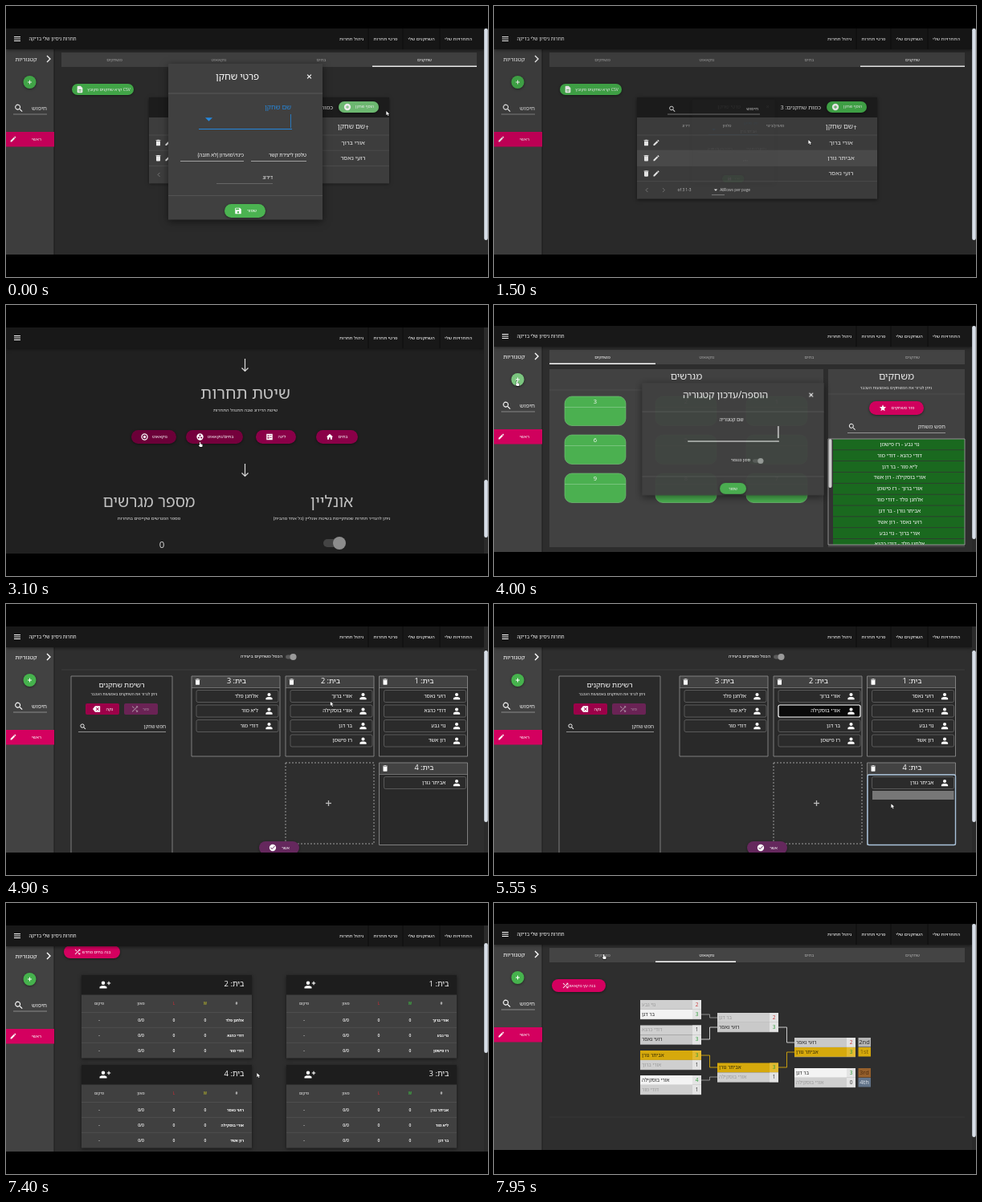
An HTML page with a canvas for the animation above (8000 ms loop, 600 px wide and 338 px high).

```html
<!DOCTYPE html>
<html lang="he">
<head>
<meta charset="utf-8">
<title>ניהול תחרות</title>
<style>
html,body{margin:0;width:100%;height:100%;overflow:hidden;background:#000}
canvas{display:block;width:600px;height:338px}
</style>
</head>
<body>
<canvas id="stage"></canvas>
<script>
const W = 600, H = 338, LOOP = 8000;
const LIFT = 2; // some clips sit slightly higher on the stage
const FONT = '"Open Sans","Noto Sans Hebrew","Noto Sans","Liberation Sans",sans-serif';
const PINK = '#d4005f', GREEN = '#46b24d', CARD = '#424242', PAGE = '#2e2e2e', DARK = '#1d1d1d';
const P = ['אורי ברוך', 'רועי נאסר', 'אביתר גורן', 'נוי גבע', 'רז פישמן', 'דודי כהנא',
  'בר דגן', 'ליא מור', 'אורי בוסקילה', 'רון אשד', 'אלחנן פלד', 'דודי מור'];

const DISC = 'M12 2a10 10 0 1 0 0 20 10 10 0 0 0 0-20z';
const ICONS = {
  trash: 'M6 19a2 2 0 0 0 2 2h8a2 2 0 0 0 2-2V7H6zM19 4h-3.5l-1-1h-5l-1 1H5v2h14z',
  pencil: 'M3 17.2V21h3.8L17.8 9.9l-3.7-3.7zM20.7 7a1 1 0 0 0 0-1.4l-2.3-2.3a1 1 0 0 0-1.4 0l-1.9 1.8 3.8 3.8z',
  person: 'M12 3a4.5 4.5 0 1 0 0 9 4.5 4.5 0 0 0 0-9zM3 21v-3c0-5 18-5 18 0v3z',
  search: 'M15.5 14h-.8l-.3-.3a6.5 6.5 0 1 0-.7.7l.3.3v.8l5 5 1.5-1.5zM9.5 14a4.5 4.5 0 1 1 0-9 4.5 4.5 0 0 1 0 9z',
  save: 'M17 3H5a2 2 0 0 0-2 2v14a2 2 0 0 0 2 2h14a2 2 0 0 0 2-2V7zM12 19a3 3 0 1 1 0-6 3 3 0 0 1 0 6zM15 9H5V5h10z',
  file: 'M14 2H6a2 2 0 0 0-2 2v16a2 2 0 0 0 2 2h12a2 2 0 0 0 2-2V8zM8 12h8v2H8zM8 16h8v2H8z',
  star: 'M12 17.3 18.2 21l-1.6-7L22 9.2l-7.2-.6L12 2 9.2 8.6 2 9.2 7.5 14l-1.7 7z',
  home: 'M10 20v-6h4v6h5v-8h3L12 3 2 12h3v8z',
  shuffle: 'M10.6 9.2 5.4 4 4 5.4l5.2 5.2zM14.5 4l2 2L4 18.6 5.4 20 18 7.5l2 2V4zM14.8 13.4l-1.4 1.4 3.1 3.1-2 2.1H20v-5.5l-2 2z',
  add: DISC + 'M17 13h-4v4h-2v-4H7v-2h4V7h2v4h4z',
  check: DISC + 'M10 17l-5-5 1.4-1.4 3.6 3.6 7.6-7.6L19 8z',
  table: 'M3 3h18v18H3zM6 7h5v3H6zM6 13h5v4H6zM13 7h5v2h-5zM13 13h5v2h-5z',
  aim: DISC + 'M12 5a7 7 0 1 1 0 14 7 7 0 0 1 0-14zM12 8a4 4 0 1 0 0 8 4 4 0 0 0 0-8z',
  group: DISC + 'M12 5a2.5 2.5 0 1 0 0 5 2.5 2.5 0 0 0 0-5zM8 12a2.5 2.5 0 1 0 0 5 2.5 2.5 0 0 0 0-5zM16 12a2.5 2.5 0 1 0 0 5 2.5 2.5 0 0 0 0-5z',
  erase: 'M22 3H7L0 12l7 9h15zM19 15.6 17.6 17 14 13.4 10.4 17 9 15.6 12.6 12 9 8.4 10.4 7 14 10.6 17.6 7 19 8.4 15.4 12z',
  hand: 'M9 11V4a1.5 1.5 0 0 1 3 0v6l6 1.5c1.5.4 2 1.2 1.8 2.5L19 21H10l-5-6 1.3-1.2L9 15z',
  arrow: 'M7 3v16l4-4 3 7 2.5-1-3-7H19z'
};
const paths = {};
for (const k in ICONS) paths[k] = new Path2D(ICONS[k]);

const stage = document.getElementById('stage');
const dpr = window.devicePixelRatio || 1;
const layers = [];
let c, depth = 0;

function setup(cv) {
  cv.width = W * dpr;
  cv.height = H * dpr;
  return cv.getContext('2d');
}
const main = setup(stage);

// Paints fn on its own layer, then blends the layer in, scaled about (cx, cy).
function group(alpha, scale, cx, cy, fn) {
  if (alpha <= 0) return;
  const outer = c;
  const g = layers[depth] || (layers[depth] = setup(document.createElement('canvas')));
  depth++;
  g.setTransform(dpr, 0, 0, dpr, 0, 0);
  g.clearRect(0, 0, W, H);
  c = g;
  fn();
  c = outer;
  depth--;
  c.save();
  c.globalAlpha = alpha;
  c.translate(cx, cy);
  c.scale(scale, scale);
  c.drawImage(g.canvas, -cx, -cy, W, H);
  c.restore();
}

const clamp = v => Math.max(0, Math.min(1, v));
const prog = (t, a, b) => clamp((t - a) / (b - a));
const ease = p => p * p * (3 - 2 * p);
const mix = (a, b, p) => a + (b - a) * p;

function text(s, x, y, size, color = '#fff', align = 'center', weight = 400) {
  c.font = `${weight} ${size}px ${FONT}`;
  c.direction = 'rtl';
  c.textAlign = align;
  c.fillStyle = color;
  c.fillText(s, x, y + size * 0.3);
}
function rect(x0, y0, x1, y1, color) {
  c.fillStyle = color;
  c.fillRect(x0, y0, x1 - x0, y1 - y0);
}
function round(x0, y0, x1, y1, r, fill, stroke, lw = 1) {
  c.beginPath();
  c.roundRect(x0, y0, x1 - x0, y1 - y0, r);
  if (fill) { c.fillStyle = fill; c.fill(); }
  if (stroke) { c.strokeStyle = stroke; c.lineWidth = lw; c.stroke(); }
}
function disc(x, y, r, color) {
  c.fillStyle = color;
  c.beginPath();
  c.arc(x, y, r, 0, 7);
  c.fill();
}
function line(pts, color = '#777', lw = 0.7) {
  c.strokeStyle = color;
  c.lineWidth = lw;
  c.beginPath();
  for (let i = 0; i < pts.length; i += 2) c.lineTo(pts[i], pts[i + 1]);
  c.stroke();
}
function icon(name, x, y, size, color = '#fff') {
  c.save();
  c.translate(x - size / 2, y - size / 2);
  c.scale(size / 24, size / 24);
  c.fillStyle = color;
  c.fill(paths[name], 'evenodd');
  c.restore();
}
function shadowed(blur, fn) {
  c.save();
  c.shadowColor = 'rgba(0,0,0,.5)';
  c.shadowBlur = blur * dpr;
  c.shadowOffsetY = blur / 4 * dpr;
  fn();
  c.restore();
}
function pill(x0, y0, x1, y1, color, label, tx, size, ic, ix, fg = '#fff') {
  shadowed(3, () => round(x0, y0, x1, y1, (y1 - y0) / 2, color));
  const y = (y0 + y1) / 2;
  text(label, tx, y, size, fg, 'center', 500);
  if (ic) icon(ic, ix, y, 10, fg);
}
function cross(x, y, r, color = '#fff') {
  line([x - r, y - r, x + r, y + r], color, 1.1);
  line([x - r, y + r, x + r, y - r], color, 1.1);
}
function plus(x, y, r, color, lw) {
  line([x - r, y, x + r, y], color, lw);
  line([x, y - r, x, y + r], color, lw);
}
function toggle(x0, x1, y, r) {
  round(x0, y - r * 0.6, x1, y + r * 0.6, r * 0.6, '#5a5a5a');
  disc(x1 - r, y, r, '#9a9a9a');
}
function triangle(x, y, r, color) {
  c.fillStyle = color;
  c.beginPath();
  c.moveTo(x - r, y - r / 2);
  c.lineTo(x + r, y - r / 2);
  c.lineTo(x, y + r / 2);
  c.fill();
}
const glow = a => `rgba(255,255,255,${a})`;

// Track points: [time, x, y]
function cursor(t, track, hand) {
  let i = 0;
  while (i < track.length - 2 && t > track[i + 1][0]) i++;
  const a = track[i], b = track[i + 1], p = ease(prog(t, a[0], b[0]));
  const x = mix(a[1], b[1], p), y = mix(a[2], b[2], p);
  const name = hand ? 'hand' : 'arrow';
  icon(name, x, y, 9.5, '#000');
  icon(name, x, y, 8, '#fff');
}

function topbar(title) {
  shadowed(4, () => rect(0, 28, 595, 54, '#181818'));
  for (const d of [-2.5, 0, 2.5]) line([10, 41 + d, 18, 41 + d], '#fff', 1);
  if (title) text('תחרות ניסיון שלי בדיקה', 58, 41, 5.9, '#fff', 'center', 500);
  const nav = [['ניהול תחרות', 430], ['פרטי תחרות', 472.5], ['השחקנים שלי', 517], ['התחרויות שלי', 563]];
  for (const [s, x] of nav) text(s, x, 41, 5.8, '#fff', 'center', 500);
  for (const x of [451, 494, 540]) line([x, 28, x, 54], '#080808', 0.6);
}
function scrollbar(y0, y1) {
  rect(595, 28, 600, 310, '#2a2a2a');
  round(595.2, y0, 599.8, y1, 2.3, '#d8dfe8');
}
function sidebar(press = 0) {
  rect(0, 54, 60, 310, CARD);
  line([60, 54, 60, 310], '#1c1c1c', 1);
  text('קטגוריות', 25, 66.5, 7.3);
  line([51, 62, 55, 66, 51, 70], '#fff', 1.4);
  shadowed(3, () => disc(29.5, 95, 8, GREEN));
  if (press) disc(29.5, 95, 8, glow(0.3 * press));
  plus(29.5, 95, 2.5, '#fff', 1);
  icon('search', 16, 127.5, 13);
  text('חיפוש', 51, 127.5, 7.4, '#eee', 'right');
  line([9, 135, 51, 135], '#aaa');
  rect(0, 157, 60, 175.5, PINK);
  icon('pencil', 9, 166, 9);
  text('ראשי', 38, 166, 5.6, '#fff', 'center', 500);
}
function tabs(active, x0, x1, dy = 0) {
  rect(69, 58 + dy, 586, 76 + dy, '#444');
  [['משחקים', 135], ['נוקאאוט', 265], ['בתים', 392.5], ['שחקנים', 521]].forEach(([s, x], i) =>
    text(s, x, 67 + dy, 5.4, i === active ? '#fff' : '#aaa', 'center', 500));
  rect(x0, 74.5 + dy, x1, 76 + dy, '#fff');
}
function frame(oy, bg, body) {
  rect(0, 0, W, H, '#000');
  c.save();
  c.translate(0, oy);
  c.beginPath();
  c.rect(0, 28, W, 282);
  c.clip();
  rect(0, 28, W, 310, bg);
  body();
  c.restore();
}
function dim(a) { if (a > 0) rect(0, 28, W, 310, `rgba(0,0,0,${a})`); }

function playerDialog(t) {
  const blue = '#2587dc';
  shadowed(9, () => rect(202, 72, 394, 266.5, '#404040'));
  text('פרטי שחקן', 288, 88, 11.7);
  cross(377.5, 88, 2.4);
  line([202, 109, 394, 109], '#636363');
  text('שם שחקן', 355, 126.5, 8.2, blue, 'right');
  triangle(252.5, 141.5, 4.5, blue);
  const name = P[2].slice(0, Math.floor(prog(t, 300, 850) * P[2].length));
  text(name, 352, 145, 8.5, '#fff', 'right');
  if (t % 1000 < 500 && !name) line([354.5, 135, 354.5, 152], blue, 0.8);
  line([240, 153.5, 356, 153.5], blue, 1.1);
  text('טלפון ליצירת קשר', 374, 186, 6.2, '#fff', 'right');
  text('כינוי\\מועדון (לא חובה)', 296, 186, 6.2, '#fff', 'right');
  text('דירוג', 332, 214, 6.2, '#fff', 'right');
  line([305, 193.5, 374, 193.5], '#ccc');
  line([217, 193.5, 296, 193.5], '#ccc');
  line([262, 221.5, 332, 221.5], '#777');
  line([202, 236.5, 394, 236.5], '#5c5c5c');
  pill(272, 247, 323, 264, '#4bb351', 'שמור', 306, 5.4, 'save', 289);
}

function players(t) {
  const three = t >= 1250;
  const rows = three ? [P[0], P[2], P[1]] : [P[0], P[1]];
  frame(0, PAGE, () => {
    sidebar();
    tabs(3, 456, 586);
    pill(82, 97, 159, 111, GREEN, 'CSV קרא שחקנים מקובץ', 128, 5.2, 'file', 92);
    const end = 161 + rows.length * 19.2;
    shadowed(4, () => rect(178, 114, 477, end + 22, CARD));
    rect(178, 114, 477, 139, '#1e1e1e');
    pill(414, 119, 464, 133, GREEN, 'הוסף שחקן', 446.5, 4.9, 'add', 425);
    const ripple = 1 - prog(t, 0, 350);
    if (ripple) round(414, 119, 464, 133, 7, glow(0.25 * ripple));
    text('כמות שחקנים: ' + rows.length, 407, 127, 7.4, '#e5e5e5', 'right');
    icon('search', 222, 128.5, 10);
    text('חיפוש', 329, 128.5, 5.8, '#ddd', 'right');
    line([216, 135, 331, 135], '#aaa');
    text('שם שחקן', 447, 150, 8.5, '#fff', 'right');
    line([449.5, 154, 449.5, 149.5], '#eee');
    line([447.8, 151, 449.5, 149.3, 451.2, 151], '#eee');
    text('מועדון/כינוי', 350, 150, 4.6, '#bbb', 'center', 500);
    text('טלפון', 290, 150, 4.6, '#bbb', 'center', 500);
    text('דירוג', 239, 150, 4.6, '#bbb', 'center', 500);
    rows.forEach((name, i) => {
      const y = 161 + i * 19.2;
      if (three && i === 1) rect(178, y, 477, y + 19, '#525252');
      line([178, y, 477, y], '#5a5a5a');
      text(name, 432, y + 9.5, 7.5);
      icon('trash', 189.5, y + 9.5, 10);
      icon('pencil', 202, y + 9.5, 9.5);
    });
    const fy = end + 11;
    line([178, end, 477, end], '#5a5a5a');
    line([191.5, fy - 2.5, 189, fy, 191.5, fy + 2.5], '#888', 0.9);
    line([210, fy - 2.5, 212.5, fy, 210, fy + 2.5], '#888', 0.9);
    text(`1-${rows.length} of ${rows.length}`, 237, fy, 4.8, '#ddd');
    text('All', 284, fy, 4.8, '#fff');
    triangle(276, fy, 2.2, '#fff');
    line([271, fy + 6, 287, fy + 6], '#aaa');
    text('Rows per page:', 302, fy, 4.8, '#ddd');
    topbar(true);
    dim(mix(0.08, 0.3, prog(t, 0, 300)) * (1 - prog(t, 1250, 1650)));
    scrollbar(28, 292);
    const p = prog(t, 1250, 1520);
    group(1 - p, 1 - p / 2, 298, 169, () => playerDialog(t));
    cursor(t, [[0, 475, 134], [250, 475, 134], [600, 345, 150], [900, 340, 160], [1200, 300, 256],
      [1280, 300, 256], [1500, 393, 170], [1650, 470, 46]]);
  });
}

function downArrow(y) {
  line([297.5, y - 8, 297.5, y + 7], '#ddd', 1.2);
  line([293.5, y + 3.5, 297.5, y + 7.5, 301.5, y + 3.5], '#ddd', 1.2);
}
function details(t) {
  const scroll = mix(-655, -270, ease(prog(t, 1750, 2500))) + 270 * ease(prog(t, 2550, 2950));
  const grey = '#c2c2c2';
  frame(0, '#202020', () => {
    c.save();
    c.translate(0, -scroll);
    ['שם תחרות', 'תיאור', 'מיקום', 'תאריך', 'שעה'].forEach((s, i) => {
      const y = 111 - 131 * (5 - i);
      if (i) downArrow(y - 36);
      text(s, 298, y, 20.5, grey);
      line([240, y + 46, 356, y + 46], '#888');
    });
    downArrow(75);
    text('שיטת תחרות', 298, 111, 20.5, grey);
    text('שיטת הדירוג שבה תתנהל התחרות', 298, 131, 5.6, '#ddd');
    const hover = t > 3000 ? '#75003c' : '#8a0048';
    pill(386, 156, 438, 173, '#8a0048', 'בתים', 419.5, 5.4, 'home', 403);
    pill(311, 156, 361, 173, '#8a0048', 'ליגה', 343.5, 5.4, 'table', 328);
    pill(224, 156, 295, 173, hover, 'בתים/נוקאאוט', 267, 5.4, 'group', 241.5);
    pill(156, 156, 212, 173, '#6b0038', 'נוקאאוט', 191.5, 5.4, 'aim', 172.5);
    downArrow(206);
    text('אונליין', 405.5, 246, 19.5, grey);
    text('מספר מגרשים', 178, 246, 19.5, grey);
    text('ניתן להגדיר תחרות שמתקיימת בשיטת אונליין (כל אחד מהבית)', 405.5, 266, 5.6, '#ddd');
    text('מספר המגרשים שקיימים בתחרות', 178, 266, 5.6, '#ddd');
    text('0', 194, 300, 11.5, '#ddd');
    round(395, 292, 420, 302, 5, '#444');
    disc(415, 297, 8, '#8c8c8c');
    c.restore();
    topbar(false);
    const y = 218 + scroll / 655 * 163;
    scrollbar(y, y + 72);
    cursor(t, [[1650, 470, 46], [2100, 400, 180], [2600, 330, 200], [3050, 242, 174], [3400, 242, 174]], t > 2950);
  });
}

function categoryDialog(t) {
  shadowed(9, () => rect(184, 97, 411, 237.5, '#404040'));
  text('הוספה/עדכון קטגוריה', 288, 112, 11.8);
  cross(395, 112, 2.3);
  line([184, 133, 411, 133], '#636363');
  text('שם קטגוריה', 295.5, 143, 6);
  if (t % 1000 < 500) line([354, 151, 354, 166], '#fff', 1.2);
  line([241, 170, 355, 170], '#fff', 1.2);
  text('סמן כנגמר', 319, 193.5, 5.6, '#fff', 'right');
  toggle(322, 335.5, 194.5, 3.6);
  line([184, 214, 411, 214], '#5c5c5c');
  pill(281, 222, 314, 236, '#4bb351', 'שמור', 297.5, 5);
}

function games(t) {
  const pairs = [[3, 4], [5, 11], [7, 6], [8, 9], [0, 4], [10, 11], [2, 6], [1, 9], [0, 3], [10, 5]];
  const press = prog(t, 3700, 3750) * (1 - prog(t, 4150, 4300));
  frame(-LIFT, PAGE, () => {
    sidebar(press);
    tabs(0, 69, 201);
    topbar(true);
    c.save();
    c.translate(0, LIFT);
    rect(69, 80, 410, 302, CARD);
    text('מגרשים', 239.5, 89.5, 12.2, '#eee');
    line([69, 106, 410, 106], '#555');
    for (let i = 0; i < 9; i++) {
      const x = 314 - i % 3 * 113, y = 114 + Math.floor(i / 3) * 48;
      round(x, y, x + 76, y + 36.5, 9, '#4db352', '#7ecb82', 0.6);
      text(i + 1, x + 38, y + 7, 7.5);
      line([x, y + 13.5, x + 76, y + 13.5], '#8fd093');
    }
    rect(416, 80, 586, 302, CARD);
    text('משחקים', 501, 89.5, 12.2, '#eee');
    text('ניתן לגרור את המשחקים באמצעות העכבר', 500.5, 103, 5.1, '#eee');
    line([416, 111, 586, 111], '#555');
    pill(467, 120, 535, 137, PINK, 'פזר משחקים', 509, 5.4, 'star', 484);
    icon('search', 446, 152, 11);
    text('חפש משחק', 562, 152, 7, '#eee', 'right');
    line([440, 159.5, 562, 159.5], '#bbb');
    c.save();
    c.beginPath();
    c.rect(416, 167, 170, 132);
    c.clip();
    rect(416, 167, 586, 299, '#333');
    pairs.forEach(([a, b], i) => {
      const y = 167 + i * 13.85;
      rect(422, y + 0.3, 586, y + 13.4, '#1b6b20');
      text(`${P[a]} - ${P[b]}`, 505, y + 6.8, 6.7);
    });
    c.restore();
    round(416.5, 167, 420.5, 228, 2, '#d5d5d5');
    round(416, 167, 586, 299, 0, null, '#aaa', 0.8);
    c.restore();
    const close = 1 - prog(t, 4420, 4620);
    const p = ease(prog(t, 3780, 4010)) * close;
    dim(0.3 * prog(t, 3980, 4300) * close);
    scrollbar(28, 294);
    c.translate(0, LIFT);
    group(p * 0.96, 0.5 + p / 2, 298, 167, () => categoryDialog(t));
    cursor(t, [[3450, 150, 140], [3750, 29, 98], [4080, 29, 98], [4350, 395, 115], [4700, 395, 115]],
      t > 3650 && t < 4150);
  });
}

function playerCard(x, y, name, lit) {
  round(x, y, x + 102, y + 15, 2, lit ? '#0a0a0a' : '#2b2b2b', lit ? '#fff' : '#666', lit ? 1.2 : 0.8);
  text(name, x + 77, y + 7.3, 6.6, '#fff', 'right');
  icon('person', x + 90.5, y + 7.5, 11);
}
function house(n, x, y, h, list, opt = {}) {
  rect(x, y, x + 110, y + h, '#292929');
  rect(x, y, x + 110, y + 14.5, CARD);
  round(x, y, x + 110, y + h, 0, null, '#8a8a8a', 0.9);
  line([x, y + 14.5, x + 110, y + 14.5], '#8a8a8a');
  if (opt.drop) round(x + 0.5, y + 15, x + 110, y + h, 2, null, '#a9c2da', 1.4);
  text('בית: ' + n, x + 56, y + 6.5, 9.2);
  icon('trash', x + 7.5, y + 7, 10);
  list.forEach((id, i) => playerCard(x + 6, y + 17.5 + i * 18.5, P[id], id === opt.lit));
}
function houses(t) {
  const moved = t >= 5720, drag = t >= 5200 && !moved;
  const track = [[4700, 395, 118], [5150, 420, 134], [5200, 420, 134], [5500, 496, 254], [5700, 496, 242],
    [5800, 496, 242], [6150, 345, 304], [6400, 345, 304]];
  const over = t >= 5400 && !moved;
  frame(0, PAGE, () => {
    sidebar();
    text('הכפל משחקים ביצירה', 344, 65, 5.7, '#fff', 'right');
    toggle(348, 361.5, 66, 4);
    line([69, 82, 586, 82], '#444');
    round(81, 90, 207, 320, 0, '#2a2a2a', '#8a8a8a', 0.9);
    text('רשימת שחקנים', 144, 101, 8.8);
    text('ניתן לגרור את השחקנים באמצעות העכבר', 147, 112.5, 4.8, '#eee', 'center', 500);
    round(99, 124, 141, 138, 2, '#9c0049');
    text('נקה', 129, 131, 5.4);
    icon('erase', 113, 131, 10);
    round(147, 124, 189, 138, 2, '#6a2355');
    text('פזר', 174, 131, 5.4, '#a98aa0');
    icon('shuffle', 160.5, 131, 11, '#a98aa0');
    icon('search', 96, 153, 9.5);
    text('חפש שחקן', 199, 153, 6, '#eee', 'right');
    line([90, 159.5, 199, 159.5], '#bbb');
    house(3, 231, 90, 100, [10, 7, 11]);
    house(2, 348, 90, 100, moved ? [0, 6, 4] : [0, 8, 6, 4], { lit: drag ? 8 : -1 });
    house(1, 464.5, 90, 100, [1, 5, 3, 9]);
    house(4, 464.5, 198, 102.5, moved ? [2, 8] : [2], { drop: over });
    if (over) rect(471, 233, 572.5, 244, '#777');
    c.setLineDash([2, 2]);
    round(348, 198, 458, 299, 0, null, '#aaa', 0.9);
    c.setLineDash([]);
    plus(401.5, 248.5, 3.5, '#bbb', 1.3);
    pill(315, 296, 365, 312, '#65285d', 'אשר', 348, 5.4, 'check', 332);
    topbar(true);
    scrollbar(58, 272);
    cursor(t, track, t > 6100);
  });
}

function groupTable(n, x, y, ids, wColor) {
  shadowed(4, () => rect(x, y, x + 212, y + 104, '#404040'));
  rect(x, y, x + 212, y + 25, DARK);
  text('בית: ' + n, x + 202.5, y + 11.5, 9.5, '#fff', 'right');
  icon('person', x + 27, y + 12.5, 12);
  plus(x + 34, y + 10.5, 2.2, '#fff', 1.1);
  const cols = [193, 154, 115, 74, 22];
  const heads = [['#', '#ddd'], ['W', wColor], ['L', '#c22b35'], ['מאזן', '#bbb'], ['מיקום', '#bbb']];
  heads.forEach(([s, col], i) => text(s, x + cols[i], y + 36, 4.5, col, 'center', 600));
  ids.forEach((id, i) => {
    const ry = y + 57 + i * 18.9;
    line([x, ry - 10, x + 212, ry - 10], '#555');
    text(P[id], x + 202, ry, 4.8, '#fff', 'right', 600);
    ['0', '0', '0/0', '-'].forEach((s, k) => text(s, x + cols[k + 1], ry, 5, '#fff', 'center', 600));
  });
}
function tables(t) {
  const s = 45 * ease(prog(t, 6900, 7250));
  frame(0, PAGE, () => {
    c.save();
    c.translate(0, 45 - s);
    tabs(2, 327, 456, -45);
    pill(72, 53, 142, 69, PINK, 'בנה בתים מחדש', 112.5, 5.2, 'shuffle', 89);
    groupTable(1, 349, 89.5, [0, 3, 4], '#3fc443');
    groupTable(2, 94, 89.5, [10, 5, 11], '#b5b42c');
    groupTable(3, 349, 201.5, [2, 7, 6], '#3fc443');
    groupTable(4, 94, 201.5, [1, 8, 9], '#b5b42c');
    c.restore();
    sidebar();
    topbar(true);
    const y = 28 + s * 0.49;
    scrollbar(y, y + 137);
    cursor(t, [[6350, 345, 304], [6850, 314, 215], [7400, 314, 215], [7650, 265, 75]]);
  });
}

// Entry: [player, score, style], style 0 lost, 1 won, 2 path, 3 champion
function match(x, y, entries) {
  const look = [['#cfcfcf', '#999'], ['#f3f3f3', '#222'], ['#c9c9c9', '#222'], ['#d6a90c', '#2d2405']];
  entries.forEach(([id, score, k], i) => {
    const ry = y + i * 12;
    rect(x, ry, x + 76, ry + 12, look[k][0]);
    rect(x + 65, ry, x + 76, ry + 12, k === 3 ? '#e2ba31' : '#e4e4e4');
    line([x, ry + 12, x + 76, ry + 12], '#999', 0.5);
    text(P[id], x + 2, ry + 6, 6.2, look[k][1], 'left');
    const win = score > entries[1 - i][1];
    text(score, x + 70.5, ry + 6, 6.5, win ? '#299a35' : score === 2 ? '#c93a3a' : '#333');
  });
}
function link(x, y0, y1, color) {
  line([x, y0, x + 10.5, y0, x + 10.5, y1, x + 20, y1], color, 0.9);
}
function bracket(t) {
  frame(-LIFT, PAGE, () => {
    sidebar();
    tabs(1, 201, 301);
    topbar(true);
    scrollbar(28, 294);
    c.translate(0, LIFT);
    pill(72, 95, 139, 111, PINK, 'בנה עץ נוקאאוט', 109, 5.2, 'shuffle', 89);
    link(258, 139, 143, '#999');
    link(258, 170, 155, '#ddd');
    link(258, 190, 205, '#d6a90c');
    link(258, 221, 217, '#999');
    link(354, 155, 174, '#ddd');
    link(354, 205, 186, '#d6a90c');
    match(182, 121, [[3, 2, 0], [6, 3, 1]]);
    match(182, 152.5, [[5, 1, 0], [1, 3, 2]]);
    match(182, 184, [[2, 3, 3], [0, 1, 0]]);
    match(182, 215, [[8, 4, 1], [11, 1, 0]]);
    match(278, 137, [[6, 2, 0], [1, 3, 2]]);
    match(278, 199.5, [[2, 3, 3], [8, 1, 0]]);
    match(374, 168, [[1, 2, 2], [2, 3, 3]]);
    match(374, 206, [[6, 3, 1], [8, 0, 0]]);
    const places = [['2nd', 168, '#b5b5b5', '#222'], ['1st', 180, '#d6a90c', '#7a5c00'],
      ['3rd', 206, '#96602c', '#4a2a0c'], ['4th', 218, '#62748a', '#dde3ea']];
    for (const [s, y, bg, fg] of places) {
      rect(453.5, y, 469, y + 11.5, bg);
      text(s, 461, y + 5.5, 7.5, fg);
    }
    line([69, 267, 586, 267], '#3c3c3c');
    cursor(t, [[7650, 265, 70], [7930, 137, 67], [8000, 137, 67]], true);
  });
}

// Start time, fade length, painter, zoom of the outgoing scene
const scenes = [[0, 0, players, 0], [1540, 160, details, 0], [3430, 150, games, 0],
  [4560, 260, houses, 0.14], [6330, 200, tables, 0], [7690, 130, bracket, 0]];

function paint(now) {
  const t = now % LOOP;
  let i = scenes.length - 1;
  while (scenes[i][0] > t) i--;
  const [start, fade, draw, zoom] = scenes[i];
  c = main;
  c.setTransform(dpr, 0, 0, dpr, 0, 0);
  rect(0, 0, W, H, '#000');
  const p = fade ? prog(t, start, start + fade) : 1;
  if (p < 1) {
    group(1, 1 + zoom * p, 300, 169, () => scenes[i - 1][2](t));
    group(p, 1, 300, 169, () => draw(t));
  } else draw(t);
}

let first;
function tick(now) {
  if (first === undefined) first = now;
  paint(now - first);
  requestAnimationFrame(tick);
}
paint(0);
requestAnimationFrame(tick);
</script>
</body>
</html>
```
